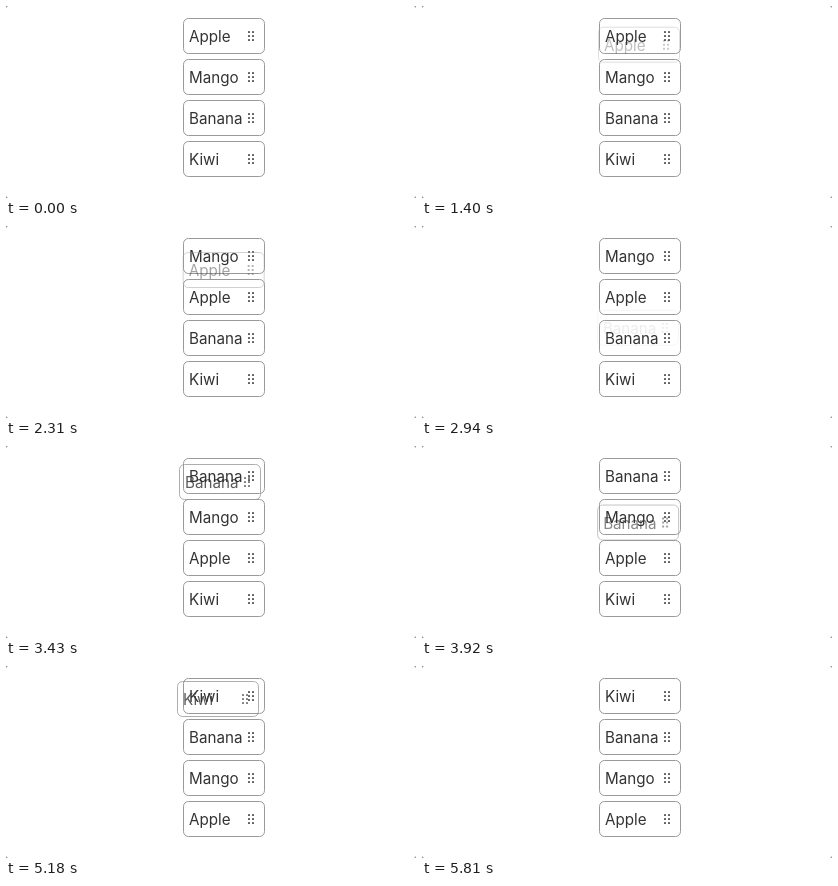
An HTML page that plays this animation: 410 by 192 pixels, repeating every 6.16 s.

```html
<!DOCTYPE html>
<html lang="en">
<head>
<meta charset="utf-8">
<title>Sortable list</title>
<style>
  html, body { margin: 0; width: 100%; height: 100%; overflow: hidden; background: #fff; }
  svg { display: block; width: 410px; height: 192px; }
  text { font: 15.2px Inter, Roboto, sans-serif; fill: #333; }
  .box { fill: none; stroke: #999; }
  .grip { fill: #555; }
</style>
</head>
<body>
<svg id="stage" viewBox="0 0 410 192">
  <path fill="#999" d="M0 0h2L0 2zM410 0v2l-2-2zM0 192v-2l2 2zM410 192h-2l2-2z"/>
</svg>
<script>
const LOOP = 6160, STEP = 70;
const FADE_IN = 140, DRIFT = 140, SLIDE = 525, GHOST_OPACITY = 0.8;
const LEFT = 177, TOP = 12, PITCH = 41;
const NAMES = ['Apple', 'Mango', 'Banana', 'Kiwi'];
const stage = document.getElementById('stage');

// Each drag lifts the item in row `home`, eases to `to`, drifts to `drop`, then slides back
const DRAGS = [
  { home: 0, begin: 1345, settle: 1750, release: 1960,
    from: { x: 176, y: 12 }, to: { x: 176, y: 53 }, drop: { x: 176, y: 54 } },
  { home: 2, begin: 2925, settle: 3430, release: 3640,
    from: { x: 175, y: 87 }, to: { x: 173, y: 18 }, drop: { x: 173, y: 18 } },
  { home: 3, begin: 4540, settle: 4760, release: 5250,
    from: { x: 174, y: 97 }, to: { x: 170, y: 18 }, drop: { x: 171, y: 15 } }
];

function add(parent, tag, attrs = {}) {
  const node = document.createElementNS('http://www.w3.org/2000/svg', tag);
  for (const key in attrs) node.setAttribute(key, attrs[key]);
  parent.appendChild(node);
  return node;
}

function makeItem(name) {
  const item = add(stage, 'g');
  add(item, 'rect', { class: 'box', x: 0.5, y: 0.5, width: 81, height: 35, rx: 5 });
  add(item, 'text', { x: 6, y: 24 }).textContent = name;
  for (let i = 0; i < 6; i++) {
    const x = 65 + 4 * (i % 2), y = 13 + 4 * Math.floor(i / 2);
    add(item, 'rect', { class: 'grip', x, y, width: 2, height: 2, rx: 0.4 });
  }
  return item;
}

const items = NAMES.map(makeItem);
const ghosts = NAMES.map(makeItem);

const rowTop = row => TOP + PITCH * row;
const rowAt = y => Math.round((y - TOP) / PITCH);
const progress = (t, start, length) => Math.min(1, Math.max(0, (t - start) / length));
const easeOut = p => Math.sin(p * Math.PI / 2);
const mix = (a, b, p) => ({ x: a.x + (b.x - a.x) * p, y: a.y + (b.y - a.y) * p });
const place = (node, { x, y }) => node.setAttribute('transform', `translate(${x} ${y})`);

function heldAt({ begin, settle, release, from, to, drop }, t) {
  const moved = mix(from, to, easeOut(progress(t, begin, settle - begin)));
  return mix(moved, drop, progress(t, release - STEP - DRIFT, DRIFT));
}

function drawGhost(ghost, drag, held, t) {
  const back = progress(t, drag.release, SLIDE);
  const shown = progress(t, drag.begin, FADE_IN) * (1 - back * back);
  place(ghost, mix(held, { x: LEFT, y: rowTop(drag.home) }, back));
  ghost.setAttribute('opacity', GHOST_OPACITY * shown);
}

function draw(now) {
  const t = Math.floor((now % LOOP) / STEP) * STEP;
  const order = NAMES.map((_, i) => i);
  ghosts.forEach(ghost => ghost.setAttribute('opacity', 0));

  for (const drag of DRAGS) {
    if (t < drag.begin) break;
    const held = heldAt(drag, t);
    const [id] = order.splice(drag.home, 1);
    order.splice(rowAt(held.y), 0, id);
    drawGhost(ghosts[id], drag, held, t);
  }
  order.forEach((id, row) => place(items[id], { x: LEFT, y: rowTop(row) }));
}

const start = performance.now();
function tick() {
  draw(performance.now() - start);
  requestAnimationFrame(tick);
}
tick();
</script>
</body>
</html>
```
